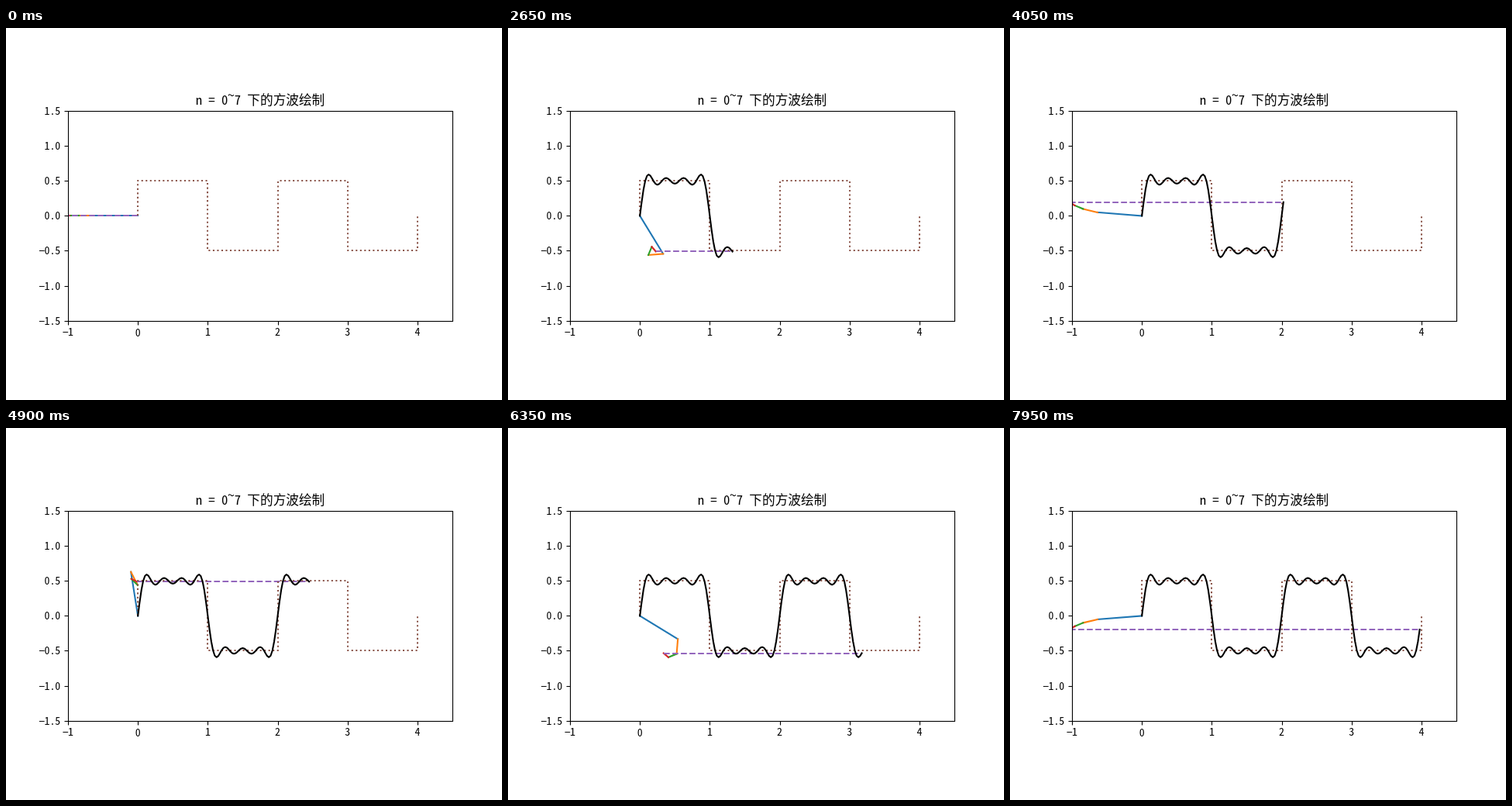
Write an HTML page with a canvas that moves like this. It is 640x480 px and loops after 8 s.

```html
<!DOCTYPE html>
<html lang="zh">
<head>
<meta charset="utf-8">
<title>方波绘制</title>
<style>
html, body { margin: 0; width: 100%; height: 100%; overflow: hidden; background: #fff; }
canvas { display: block; }
</style>
</head>
<body>
<canvas id="plot" width="640" height="480"></canvas>
<script>
const ctx = document.getElementById('plot').getContext('2d');
const STEP_MS = 50, STEPS = 160, DX = 0.025;
const UNIT = 496 / 5.5;              // pixels per data unit
const PT = 100 / 72;                 // pixels per point
const LINE = 1.5 * PT, THIN = 0.8 * PT;
const ORDERS = [1, 3, 5, 7];
const ARM_COLORS = ['#1f77b4', '#ff7f0e', '#2ca02c', '#d62728'];
const SQUARE = [[0, 0], [0, .5], [1, .5], [1, -.5], [2, -.5], [2, .5],
                [3, .5], [3, -.5], [4, -.5], [4, 0]];
const FONT = '"Noto Sans Mono CJK SC", "Noto Sans CJK SC", "Noto Sans CJK", "Noto Sans CJK JP", sans-serif';

const px = x => 80 + (x + 1) * UNIT;
const py = y => 242.4 - y * UNIT;
const snap = v => Math.floor(v + 0.5);

// Lines that run only along the axes are aligned to whole pixels.
function stroke(points, color, dash = []) {
  if (points.length < 2) return;
  let path = points.map(([x, y]) => [px(x), py(y)]);
  const straight = path.every(([x, y], i) => !i ||
    Math.abs(x - path[i - 1][0]) < 1e-4 || Math.abs(y - path[i - 1][1]) < 1e-4);
  if (straight) path = path.map(p => p.map(snap));
  ctx.beginPath();
  path.forEach(([x, y]) => ctx.lineTo(x, y));
  ctx.strokeStyle = color;
  ctx.lineWidth = LINE;
  ctx.lineJoin = 'round';
  ctx.lineCap = dash.length ? 'butt' : 'square';
  ctx.setLineDash(dash.map(d => d * LINE));
  ctx.stroke();
  ctx.setLineDash([]);
}

// Joints of the rotating arms, from the origin to the tip.
function joints(x) {
  const list = [[0, 0]];
  for (const n of ORDERS) {
    const [a, b] = list[list.length - 1];
    const r = 2 / (n * Math.PI), w = n * Math.PI * x;
    list.push([a - r * Math.cos(w), b + r * Math.sin(w)]);
  }
  return list;
}

function text(str, x, y, size, align, font = FONT) {
  ctx.font = `${size}px ${font}`;
  ctx.textAlign = align;
  ctx.fillText(str, x, y);
}

function minus(x, y, size) {
  text('\u2212', x, y, size, 'center', '"Liberation Sans", sans-serif');
}

function segment(x1, y1, x2, y2) {
  ctx.beginPath();
  ctx.moveTo(x1, y1);
  ctx.lineTo(x2, y2);
  ctx.stroke();
}

function drawAxes() {
  const size = 10 * PT, half = size / 2;
  ctx.strokeStyle = ctx.fillStyle = '#000';
  ctx.lineWidth = THIN;
  ctx.lineCap = 'butt';
  ctx.lineJoin = 'miter';
  ctx.strokeRect(80.5, 107.5, 496, 271);

  for (let v = -1; v <= 4; v++) {
    const x = snap(px(v)) + 0.5;
    segment(x, 378.5, x, 383.5);
    if (v < 0) {
      minus(px(v) - half / 2, 397, size);
      text('1', px(v) + half / 2, 397, size, 'center');
    } else {
      text(String(v), px(v), v ? 397 : 398, size, 'center');
    }
  }
  for (let v = -1.5; v <= 1.5; v += 0.5) {
    const y = snap(py(v)) + 0.5;
    segment(75.5, y, 80.5, y);
    const base = snap(py(v)) + 5;
    text(Math.abs(v).toFixed(1), 70.3, base, size, 'right');
    if (v < 0) minus(70.3 - 3.5 * half, base, size);
  }
}

function drawTitle() {
  const size = 12 * PT, half = size / 2, left = 328 - 10 * half;
  text('n = 0', left, 99, size, 'left');
  text('~', left + 5.5 * half, 93, size, 'center');
  text('7 下的方波绘制', left + 6 * half, 99, size, 'left');
}

function draw(k) {
  const x = k * DX, arm = joints(x), tip = arm[arm.length - 1];
  const trace = [];
  for (let i = 0; i <= k; i++) trace.push([i * DX, joints(i * DX)[4][1]]);

  ctx.fillStyle = '#fff';
  ctx.fillRect(0, 0, 640, 480);
  ctx.save();
  ctx.beginPath();
  ctx.rect(80, 107, 496, 271);
  ctx.clip();
  ARM_COLORS.forEach((c, i) => stroke([arm[i], arm[i + 1]], c));
  stroke([tip, [x, tip[1]]], '#9467bd', [3.7, 1.6]);
  stroke(SQUARE, '#8c564b', [1, 1.65]);
  stroke(trace, '#000');
  ctx.restore();
  drawAxes();
  drawTitle();
}

const start = performance.now();
function tick() {
  const t = Math.max(0, performance.now() - start);
  draw(Math.floor(t / STEP_MS) % STEPS);
  requestAnimationFrame(tick);
}
tick();
</script>
</body>
</html>
```
